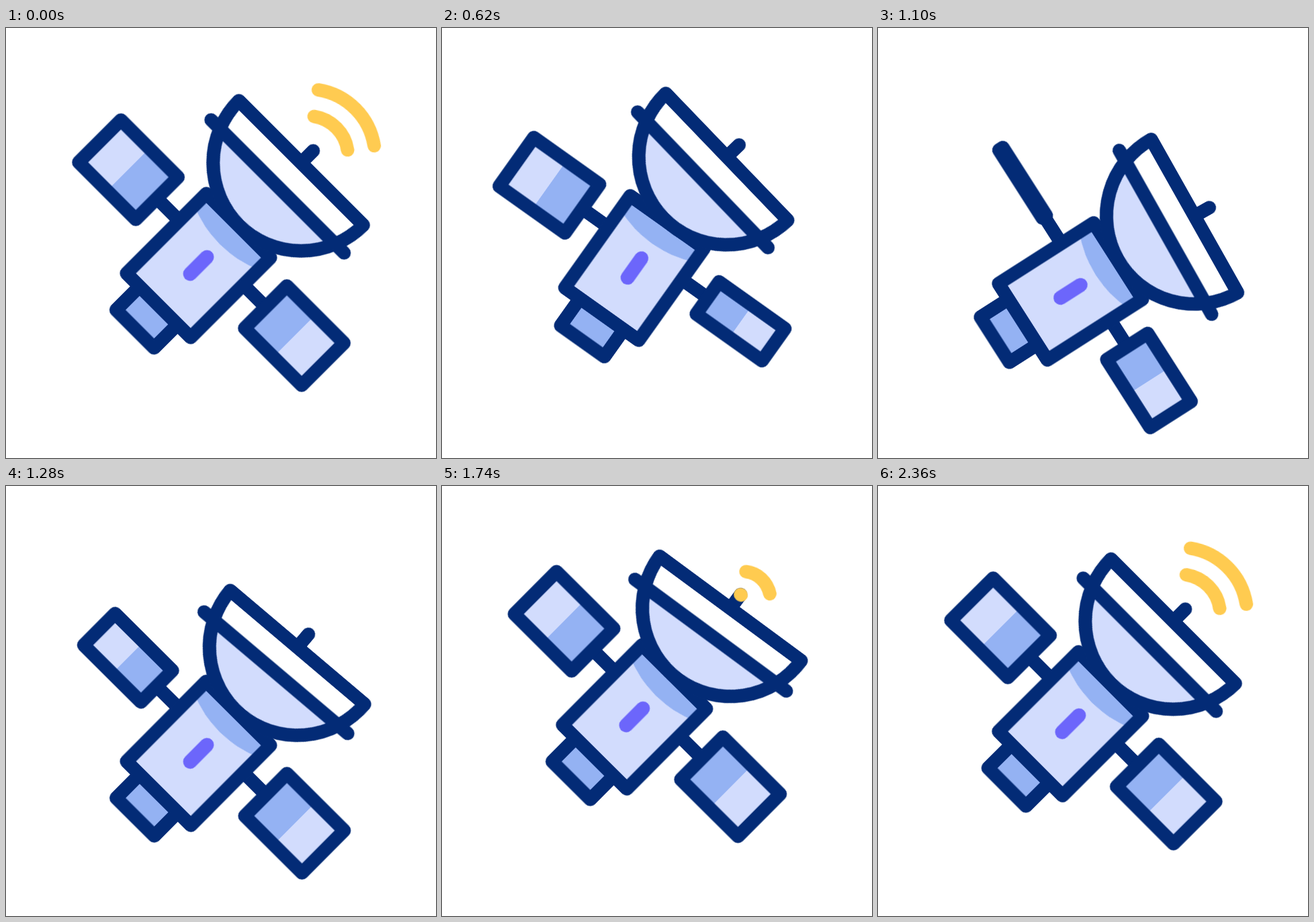
An HTML page without scripts for the animation above (2400 ms loop, 640 px wide and 640 px high).

```html
<!DOCTYPE html>
<html lang="en">
<head>
<meta charset="utf-8">
<title>Satellite</title>
<style>
  html, body { margin: 0; width: 100%; height: 100%; overflow: hidden; background: #fff; }
  svg { display: block; width: 100%; height: 100%; }

  .ink { stroke: #032b76; stroke-width: 20; stroke-linecap: round; stroke-linejoin: round; }
  .light { fill: #d2dcfd; }
  .mid { fill: #94b2f3; }
  .wave { fill: none; stroke: #ffcb50; stroke-width: 20; stroke-linecap: round; stroke-dasharray: 72 288; }

  .bob, .turn, .sway, .panel, .drift, .wave {
    animation: 2400ms cubic-bezier(.333, 0, .667, 1) infinite;
  }
  .bob { animation-name: bob; }
  .turn { animation-name: turn; }
  .sway { animation-name: sway; }
  .panel { animation-name: fold; }
  .panel.late { animation-delay: -2200ms; }
  .drift { animation-name: drift; }
  .drift.late { animation-delay: -2280ms; }
  .outer { animation-name: outer; }
  .inner { animation-name: inner; }

  @keyframes bob {
    0%, 100% { transform: translateY(0); }
    17.083% { transform: translateY(54px); }
    33.333% { transform: translateY(-35.5px); }
    50% { transform: translateY(52px); }
    66.667% { transform: translateY(-19px); }
    83.333% { transform: translateY(13px); }
  }
  @keyframes turn {
    0%, 2.5%, 100% { transform: rotate(45deg); }
    18.333% { transform: rotate(27.3deg); }
    41.667% { transform: rotate(60.3deg); }
    60.833% { transform: rotate(37deg); }
    80.833% { transform: rotate(49.5deg); }
  }
  @keyframes sway {
    0%, 100% { transform: rotate(0deg); }
    32.5% { transform: rotate(12deg); }
    63.333% { transform: rotate(-10deg); }
  }
  @keyframes fold {
    0%, 20%, 50%, 100% { y: -71.5px; height: 89px; }
    35% { y: -27px; height: .1px; }
  }
  @keyframes drift {
    0%, 80%, 100% { transform: translate(0, 0) rotate(0deg); }
    66.667% { transform: translate(0, -11px) rotate(0deg); }
    72.5% { transform: translate(6.4px, -8px) rotate(6.5deg); }
  }
  @keyframes outer {
    0%, 80%, 100% { r: 100px; opacity: 1; }
    16.667% { r: 183px; opacity: 0; }
    66.66% { r: .1px; opacity: 0; }
    66.667% { r: .1px; opacity: 1; }
  }
  @keyframes inner {
    0%, 10%, 85%, 100% { r: 60px; opacity: 1; }
    23.333% { r: 170px; opacity: 0; }
    71.66% { r: .1px; opacity: 0; }
    71.667% { r: .1px; opacity: 1; }
  }
</style>
</head>
<body>
<svg viewBox="0 0 640 640">
  <defs>
    <linearGradient id="cells">
      <stop offset=".5" stop-color="#94b2f3"/>
      <stop offset=".5" stop-color="#d2dcfd"/>
    </linearGradient>
  </defs>
  <g transform="translate(286.5 353.5)">
    <g class="bob">
      <g class="turn">
        <path class="ink" d="M-114-27H114"/>
        <rect class="ink panel" x="114.5" y="-71.5" width="120.2" height="89" fill="url(#cells)"/>
        <g transform="scale(-1 1)">
          <rect class="ink panel late" x="114.5" y="-71.5" width="120.2" height="89" fill="url(#cells)"/>
        </g>

        <rect class="ink mid" x="-40" y="84" width="80" height="49.5"/>
        <rect class="light" x="-67.5" y="-84" width="135" height="168"/>
        <path class="mid" d="M-67-84V-58.5A171 171 0 0 0 67-58.5V-84Z"/>
        <rect class="ink" x="-67.5" y="-84" width="135" height="168" fill="none"/>
        <path d="M0-17.7V17.7" stroke="#6c66fb" stroke-width="21" stroke-linecap="round"/>

        <g transform="translate(0 -130)">
          <g class="sway">
            <g transform="translate(0 -86)">
              <path d="M-131 0H131A131 131 0 0 1-131 0Z" fill="#fff"/>
              <path class="light" d="M-121.3 49.5H121.3A131 131 0 0 1-121.3 49.5Z"/>
              <path class="ink" fill="none" d="M-131 0H131A131 131 0 0 1-131 0ZM-140 49.5H140M0 0V-25.5"/>
              <g transform="translate(0 -14)">
                <g class="drift">
                  <circle class="wave outer" r="100" pathLength="360" transform="rotate(-126)"/>
                </g>
                <g class="drift late">
                  <circle class="wave inner" r="60" pathLength="360" transform="rotate(-126)"/>
                </g>
              </g>
            </g>
          </g>
        </g>
      </g>
    </g>
  </g>
</svg>
</body>
</html>
```
